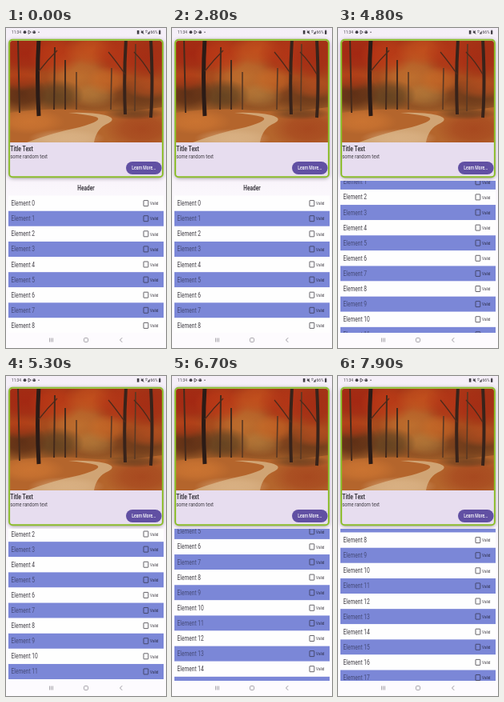
These frames come from a looping animation (200 by 400 pixels, 8000 ms). An HTML page with a canvas:

```html
<!DOCTYPE html>
<html lang="en">
<head>
<meta charset="utf-8">
<title>Card and list</title>
<style>
  html, body { margin: 0; width: 100%; height: 100%; overflow: hidden; background: #fdfbfe; }
  canvas { display: block; width: 200px; height: 400px; }
</style>
</head>
<body>
<canvas id="stage"></canvas>
<script>
const W = 200, H = 400, LOOP = 8000, STEP = 100;
const ROW = 19.1, LIST_TOP = 191, LIST_BOTTOM = 381, FIRST_ROW = 219.2;
const CONDENSED = 0.78;
const INK = '#403d45';

// [time, scroll offset]
const SCROLL = [[0, 0], [2800, 0], [3800, 37], [4200, 43.5], [4700, 43.5],
  [4800, 45.9], [6000, 83.2], [6700, 120.3], [7900, 166.8], [8000, 169]];

const stage = document.getElementById('stage');
const dpr = window.devicePixelRatio || 1;

function makeLayer(canvas) {
  canvas.width = W * dpr;
  canvas.height = H * dpr;
  const ctx = canvas.getContext('2d');
  ctx.scale(dpr, dpr);
  return ctx;
}

const slope = i => i < 0 || i >= SCROLL.length - 1 ? 0 :
  (SCROLL[i + 1][1] - SCROLL[i][1]) / (SCROLL[i + 1][0] - SCROLL[i][0]);

// Harmonic mean keeps the curve monotone and flat around pauses.
function tangent(i) {
  const a = slope(i - 1), b = slope(i);
  return a * b > 0 ? 2 * a * b / (a + b) : 0;
}

function scrollAt(t) {
  let i = 0;
  while (i < SCROLL.length - 2 && t >= SCROLL[i + 1][0]) i++;
  const [t0, y0] = SCROLL[i], [t1, y1] = SCROLL[i + 1];
  const span = t1 - t0, u = (t - t0) / span, v = 1 - u;
  return y0 * (1 + 2 * u) * v * v + y1 * u * u * (3 - 2 * u) +
    span * u * v * (tangent(i) * v - tangent(i + 1) * u);
}

function text(ctx, str, x, y, size, { color = INK, weight = 400, align = 'left' } = {}) {
  ctx.save();
  ctx.translate(x, y);
  ctx.scale(CONDENSED, 1);
  ctx.font = `${weight} ${size}px Roboto, sans-serif`;
  ctx.textAlign = align;
  ctx.fillStyle = color;
  ctx.fillText(str, 0, size * 0.355);
  ctx.restore();
}

function rect(ctx, x, y, w, h, color) {
  ctx.fillStyle = color;
  ctx.fillRect(x, y, w, h);
}

function fade(ctx, top, bottom, stops) {
  const g = ctx.createLinearGradient(0, top, 0, bottom);
  stops.forEach(([at, color]) => g.addColorStop(at, color));
  return g;
}

function rounded(ctx, x, y, w, h, r) {
  ctx.beginPath();
  ctx.roundRect(x, y, w, h, r);
}

function shape(ctx, d, color) {
  ctx.fillStyle = color;
  ctx.fill(new Path2D(d));
}

function line(ctx, d, color, width) {
  ctx.strokeStyle = color;
  ctx.lineWidth = width;
  ctx.stroke(new Path2D(d));
}

function glow(ctx, x, y, rx, ry, rgb, alpha) {
  ctx.save();
  ctx.translate(x, y);
  ctx.scale(rx, ry);
  const g = ctx.createRadialGradient(0, 0, 0, 0, 0, 1);
  g.addColorStop(0, `rgba(${rgb},${alpha})`);
  g.addColorStop(0.5, `rgba(${rgb},${alpha * 0.75})`);
  g.addColorStop(1, `rgba(${rgb},0)`);
  ctx.fillStyle = g;
  ctx.fillRect(-1, -1, 2, 2);
  ctx.restore();
}

function drawForest(ctx) {
  ctx.save();
  rounded(ctx, 5, 16, 190, 127, [3, 3, 0, 0]);
  ctx.clip();

  rect(ctx, 5, 16, 190, 127, fade(ctx, 16, 143,
    [[0, '#a23416'], [0.35, '#a84b1d'], [0.58, '#85481f'], [0.72, '#a3602a'], [1, '#b5703a']]));

  glow(ctx, 92, 62, 42, 36, '196,122,52', 0.75);
  glow(ctx, 110, 84, 30, 16, '182,128,62', 0.65);
  glow(ctx, 64, 84, 34, 20, '92,66,34', 0.8);
  glow(ctx, 20, 82, 32, 24, '84,42,20', 0.8);
  glow(ctx, 166, 86, 38, 22, '104,56,26', 0.75);

  glow(ctx, 24, 32, 42, 28, '163,38,18', 0.9);
  glow(ctx, 62, 34, 34, 24, '190,58,22', 0.8);
  glow(ctx, 18, 64, 28, 15, '184,58,22', 0.7);
  glow(ctx, 106, 28, 34, 20, '200,84,30', 0.8);
  glow(ctx, 144, 34, 37, 27, '180,52,22', 0.85);
  glow(ctx, 178, 38, 34, 30, '164,44,20', 0.9);
  glow(ctx, 178, 74, 30, 15, '190,80,32', 0.65);
  glow(ctx, 126, 66, 26, 18, '204,108,40', 0.65);

  shape(ctx, 'M5 106Q58 99 100 103T195 99V143H5Z', '#b4652c');
  glow(ctx, 30, 117, 44, 16, '206,118,50', 0.85);
  glow(ctx, 170, 126, 48, 26, '166,70,30', 0.9);
  glow(ctx, 160, 107, 38, 8, '98,60,30', 0.7);
  shape(ctx, 'M78 106Q106 105 124 109Q139 113 128 119Q113 125 110 143H26Q58 131 92 124Q124 115 112 111Q100 108 78 106Z', '#d0a474');
  glow(ctx, 76, 138, 48, 12, '222,184,140', 0.6);

  line(ctx, 'M15 14L17 106M61 24L60 102M74 40L74 102', '#452a1b', 2);
  line(ctx, 'M41 14Q38 60 41 110', '#2b1b16', 5);
  line(ctx, 'M150 14Q147 60 149 108M181 14Q184 70 181 112', '#38231a', 4);
  line(ctx, 'M162 20L161 104M132 50L131 102M88 55L88 102', '#593823', 1.6);
  line(ctx, 'M41 54Q52 40 64 28M149 58Q138 42 128 30M181 58Q172 42 160 30', '#4d2a1b', 1.3);
  ctx.restore();
}

function drawStatusBar(ctx) {
  text(ctx, '11:34', 7, 5.2, 6.2);
  ctx.fillStyle = INK;
  for (const [x, r] of [[23.5, 1.9], [35.2, 1.9], [41, 0.7]]) {
    ctx.beginPath();
    ctx.arc(x, 5.2, r, 0, 7);
    ctx.fill();
  }
  line(ctx, 'M28 3L31.4 5.2L28 7.4Z', INK, 0.8);
  rect(ctx, 34, 4.4, 0.7, 0.8, '#f5f0f8');
  rect(ctx, 35.8, 4.4, 0.7, 0.8, '#f5f0f8');
  rect(ctx, 163.8, 3, 2.6, 4.6, INK);
  shape(ctx, 'M168.8 4.2H170L171.6 2.8V7.6L170 6.2H168.8Z', INK);
  line(ctx, 'M168.8 2.8L172.4 7.6', INK, 0.6);
  line(ctx, 'M174 4Q175.5 2.4 177 4M174.6 5.6Q175.5 4.8 176.4 5.6', INK, 0.7);
  shape(ctx, 'M179.6 3.4V7.6H176.8Z', INK);
  text(ctx, '66%', 180.6, 5.2, 6.2);
  rect(ctx, 191, 3.2, 2.3, 4.6, INK);
  rect(ctx, 191.6, 2.5, 1.1, 0.8, INK);
}

function drawCard(ctx) {
  ctx.save();
  ctx.shadowColor = 'rgba(75,60,90,.5)';
  ctx.shadowBlur = 5 * dpr;
  ctx.shadowOffsetY = dpr;
  rounded(ctx, 3.5, 14, 193, 173, 5);
  ctx.fillStyle = '#e7ddef';
  ctx.fill();
  ctx.restore();

  drawForest(ctx);
  rounded(ctx, 4.1, 14.7, 191.8, 171.6, 4);
  ctx.strokeStyle = '#8cbd2c';
  ctx.lineWidth = 2;
  ctx.stroke();

  text(ctx, 'Title Text', 5.3, 150.8, 8.6, { weight: 600 });
  text(ctx, 'some random text', 5.3, 160.8, 7.4);
  rounded(ctx, 150, 167, 44.6, 16, 8);
  ctx.fillStyle = '#6150a3';
  ctx.fill();
  text(ctx, 'Learn More...', 172.3, 174.9, 6.5, { color: '#fff', weight: 500, align: 'center' });
}

function drawNavigation(ctx) {
  const grey = '#85818a';
  line(ctx, 'M54.5 387.5V392.5M56.5 387.5V392.5M58.5 387.5V392.5', grey, 0.7);
  rounded(ctx, 97.5, 387.5, 5, 5, 1.2);
  ctx.stroke();
  line(ctx, 'M145.2 387.2L142.5 390L145.2 392.8', grey, 0.8);
}

function drawRow(ctx, index, y) {
  const blue = index % 2 === 1;
  rect(ctx, 3, y - ROW / 2, 194, ROW, blue ? '#7b87d7' : '#fefefe');
  text(ctx, `Element ${index}`, 6.6, y - 0.1, 8.5, { color: blue ? '#454a76' : INK });
  rounded(ctx, 172, y - 3.6, 5.8, 7, 0.4);
  ctx.strokeStyle = blue ? '#3b3d58' : '#4b4850';
  ctx.lineWidth = 0.85;
  ctx.stroke();
  text(ctx, 'Valid', 180.1, y, 6, { color: blue ? '#2b2d48' : INK });
}

function drawList(ctx, offset) {
  ctx.save();
  ctx.beginPath();
  ctx.rect(0, LIST_TOP, W, LIST_BOTTOM - LIST_TOP);
  ctx.clip();
  text(ctx, 'Header', 100, 200.3 - offset, 8.4, { weight: 600, align: 'center' });
  const first = Math.max(0, Math.floor((offset + LIST_TOP - FIRST_ROW) / ROW));
  for (let i = first; i < first + 12; i++) drawRow(ctx, i, FIRST_ROW + i * ROW - offset);
  ctx.restore();
}

const backdrop = document.createElement('canvas');
const back = makeLayer(backdrop);
rect(back, 0, 0, W, H, fade(back, 0, 230, [[0, '#f5eff8'], [0.8, '#f8f3fa'], [1, '#fdfbfe']]));
drawStatusBar(back);
drawCard(back);
drawNavigation(back);

const ctx = makeLayer(stage);
const start = performance.now();

function render(now) {
  const elapsed = Math.max(0, now - start) % LOOP;
  const t = Math.floor(elapsed / STEP) * STEP;
  ctx.drawImage(backdrop, 0, 0, W, H);
  drawList(ctx, scrollAt(t));
  requestAnimationFrame(render);
}

render(start);
</script>
</body>
</html>
```
